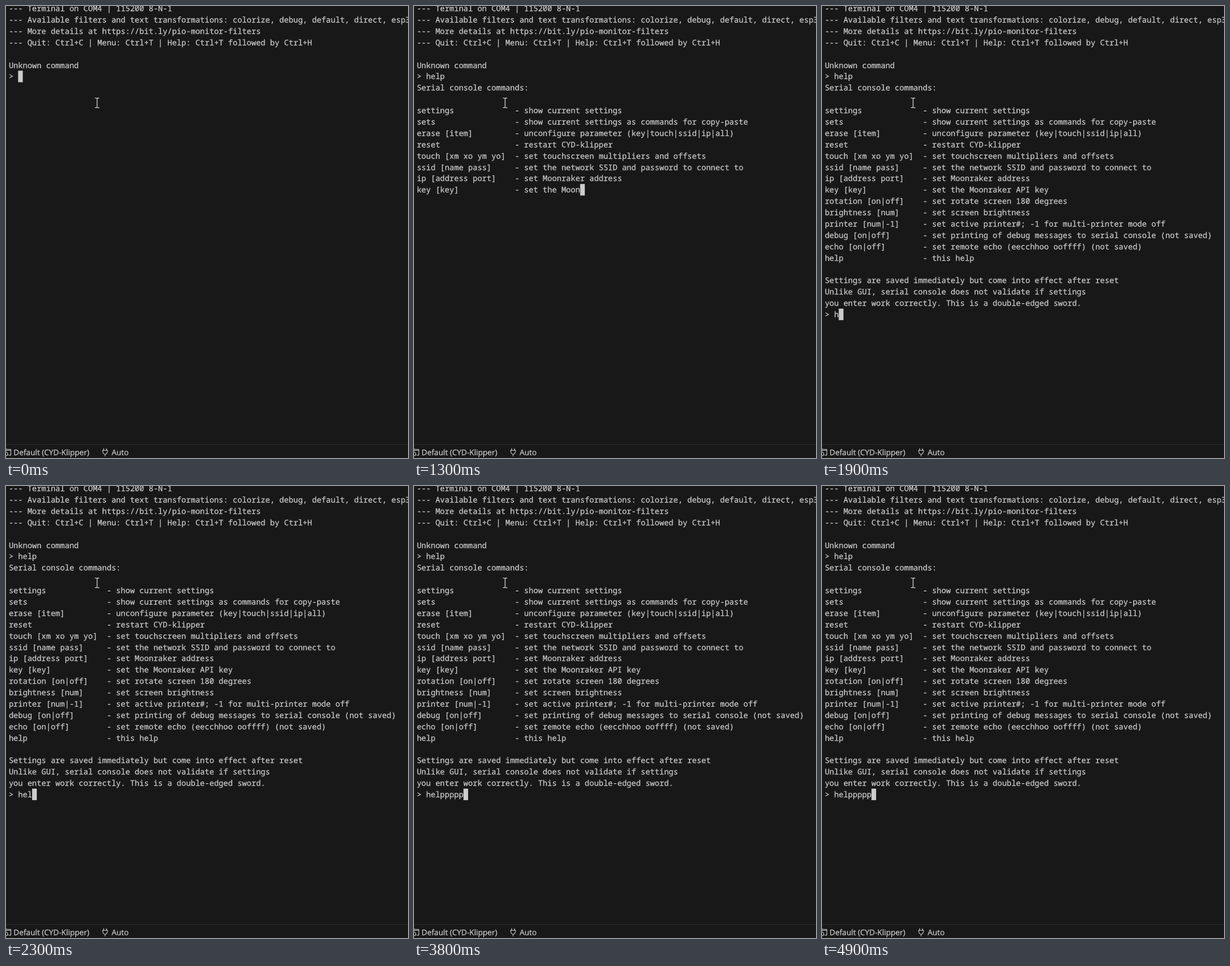
These frames come from a looping animation (706x793 px, 5000 ms). An HTML page:

```html
<!DOCTYPE html>
<html lang="en">
<head>
<meta charset="utf-8">
<title>Serial console</title>
<style>
  html, body { margin: 0; width: 100%; height: 100%; overflow: hidden; background: #181818; }
  svg { display: block; width: 706px; height: 793px; }
  text { fill: #ccc; stroke: #ccc; stroke-width: .25; white-space: pre; text-rendering: geometricPrecision; }
  .term { font: 13.66px "Noto Sans Mono", "DejaVu Sans Mono", monospace; font-variant-ligatures: none; }
  .bar { font: 13.56px "Open Sans", "Noto Sans", sans-serif; }
  .icon { fill: none; stroke: #ccc; stroke-width: 1.1; }
</style>
</head>
<body>
<svg viewBox="0 0 706 793">
  <rect width="706" height="793" fill="#181818"/>
  <g id="term" class="term"></g>
  <rect id="caret" width="8.2" height="20.2" fill="#ccc"/>

  <!-- mouse pointer -->
  <path d="M156 161.5h3l1 1 1-1h3M160 162v16M156 178.5h3l1-1 1 1h3" fill="none" stroke="#e4e4e4" stroke-width="1.2"/>

  <!-- status bar -->
  <rect y="769" width="706" height="1" fill="#2b2b2b"/>
  <g class="icon">
    <path d="M-4 781v-4.5h4l1.5 1.5h7v10h-4.5M0 780.5l1.5-1h7"/>
    <circle cx="0" cy="786" r="3"/>
    <path d="M171.5 776v3M176.5 776v3M169 779.5h10M170.2 779.5v3a3.8 3.8 0 0 0 7.6 0v-3M174 786.5v3.5"/>
  </g>
  <g class="bar">
    <text x="13.3" y="788">Default (CYD-Klipper)</text>
    <text x="185.5" y="788">Auto</text>
  </g>
</svg>
<script>
const LOOP = 5000, LEFT = 4.9, TOP = -5.8, CHAR = 8.196, LINE = 19.88, BASE = 15;

const intro = `--- Terminal on COM4 | 115200 8-N-1
--- Available filters and text transformations: colorize, debug, default, direct, esp32
--- More details at https://bit.ly/pio-monitor-filters
--- Quit: Ctrl+C | Menu: Ctrl+T | Help: Ctrl+T followed by Ctrl+H

Unknown command
> `;

const commands = [
  ['settings', 'show current settings'],
  ['sets', 'show current settings as commands for copy-paste'],
  ['erase [item]', 'unconfigure parameter (key|touch|ssid|ip|all)'],
  ['reset', 'restart CYD-klipper'],
  ['touch [xm xo ym yo]', 'set touchscreen multipliers and offsets'],
  ['ssid [name pass]', 'set the network SSID and password to connect to'],
  ['ip [address port]', 'set Moonraker address'],
  ['key [key]', 'set the Moonraker API key'],
  ['rotation [on|off]', 'set rotate screen 180 degrees'],
  ['brightness [num]', 'set screen brightness'],
  ['printer [num|-1]', 'set active printer#; -1 for multi-printer mode off'],
  ['debug [on|off]', 'set printing of debug messages to serial console (not saved)'],
  ['echo [on|off]', 'set remote echo (eecchhoo ooffff) (not saved)'],
  ['help', 'this help']
].map(([name, info]) => name.padEnd(21) + '- ' + info).join('\n');

const reply = `
Serial console commands:

${commands}

Settings are saved immediately but come into effect after reset
Unlike GUI, serial console does not validate if settings
you enter work correctly. This is a double-edged sword.
> `;

const partial = reply.slice(0, reply.indexOf('raker API'));
const done = 'help' + reply;

// [start time, text after the first prompt]
const steps = [
  [0, ''], [700, 'h'], [900, 'he'], [1000, 'hel'], [1100, 'help'],
  [1300, 'help' + partial], [1400, done],
  [1900, done + 'h'], [2100, done + 'he'], [2300, done + 'hel'], [2500, done + 'help'],
  [2800, done + 'helpp'], [3100, done + 'helppp'], [3400, done + 'helpppp'], [3700, done + 'helppppp']
];

const term = document.getElementById('term');
const caret = document.getElementById('caret');
const rows = (intro + done).split('\n').map((_, i) => {
  const row = document.createElementNS('http://www.w3.org/2000/svg', 'text');
  row.setAttribute('x', LEFT);
  row.setAttribute('y', TOP + i * LINE + BASE);
  return term.appendChild(row);
});

let shown = null;
function render(time) {
  const text = steps.findLast(([start]) => start <= time)[1];
  if (text === shown) return;
  shown = text;
  const lines = (intro + text).split('\n');
  rows.forEach((row, i) => row.textContent = lines[i] || '');
  const last = lines.length - 1;
  caret.setAttribute('x', LEFT + lines[last].length * CHAR);
  caret.setAttribute('y', TOP + last * LINE);
}

const begin = performance.now();
function tick() {
  render((performance.now() - begin) % LOOP);
  requestAnimationFrame(tick);
}
tick();
</script>
</body>
</html>
```
